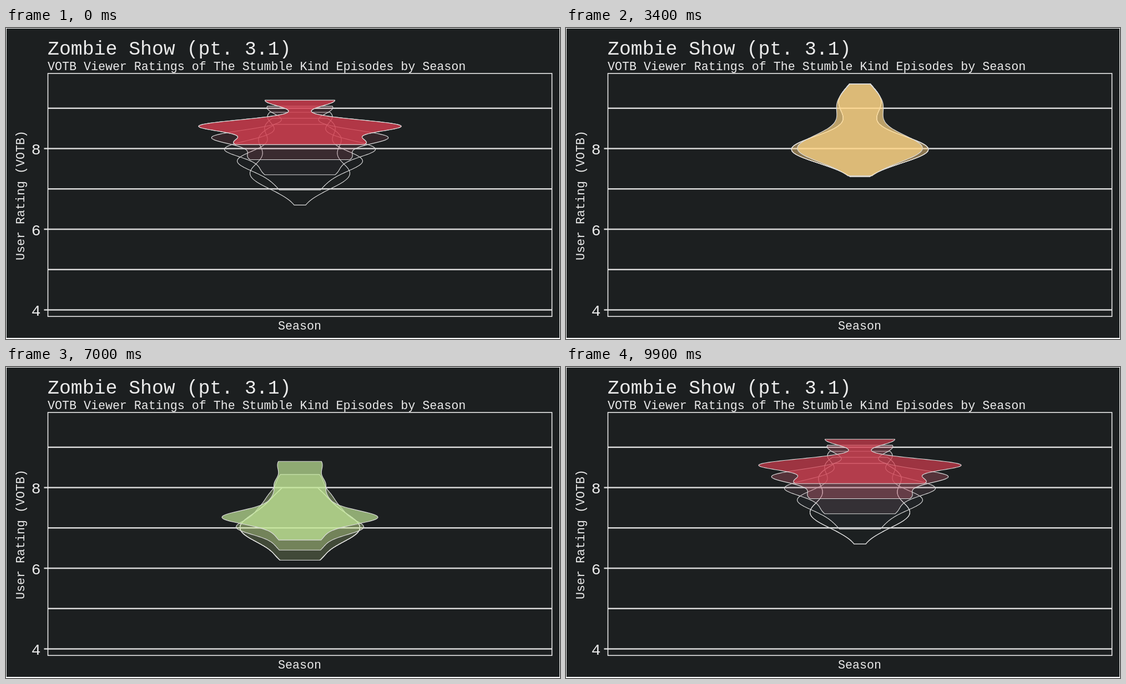
Write an HTML page that moves like this. It is 998 px wide and 561 px high and loops after 10 s.

```html
<!DOCTYPE html>
<html lang="en">
<head>
<meta charset="utf-8">
<title>Zombie Show</title>
<style>
  html, body { margin: 0; width: 100%; height: 100%; overflow: hidden; background: #fff; }
  svg { display: block; width: 998px; height: 561px; }
  text { font-family: "Liberation Mono", "Noto Sans Mono", monospace; font-size: 21.65px; fill: #ebebeb; }
  .title { font-size: 34.8px; }
  .tick { font-size: 28px; text-anchor: end; }
  .mid { text-anchor: middle; }
  .grid { stroke: #d9d9d9; stroke-width: 2.6; }
  .violin { stroke: #dcdcdc; stroke-width: 1.15; stroke-linejoin: round; }
</style>
</head>
<body>
<svg viewBox="0 0 998 561">
  <rect x="1" y="1" width="996" height="558" fill="#1c1f20"/>
  <text class="title" x="75" y="48">Zombie Show (pt. 3.1)</text>
  <text x="75" y="76">VOTB Viewer Ratings of The Stumble Kind Episodes by Season</text>
  <text class="mid" x="529" y="544">Season</text>
  <text class="mid" transform="translate(33 302) rotate(-90)">User Rating (VOTB)</text>
  <g id="axis"></g>
  <g id="violins"></g>
  <rect x="75.5" y="82" width="908" height="438.3" fill="none" stroke="#ebebeb" stroke-width="1.6"/>
</svg>
<script>
const CENTER = 529.5, STEPS = 96, FRAMES = 100, FRAME_MS = 100, WAKE = 5;
const ramp = ["#d53e4f", "#fc8d59", "#fee08b", "#ffffbf", "#e6f598", "#99d594", "#3288bd"];

const mix = (a, b, t) => a + (b - a) * t;
const mixAll = (a, b, t) => a.map((v, i) => mix(v, b[i], t));
const mixColor = (a, b, t) => `color-mix(in lab, ${a}, ${b} ${(t * 100).toFixed(1)}%)`;
const yOf = rating => 217.5 - (rating - 8) * 72.75;

function rampColor(p) {
  const at = p * (ramp.length - 1), i = Math.min(Math.floor(at), ramp.length - 2);
  return mixColor(ramp[i], ramp[i + 1], at - i);
}

// A violin is a sum of bell curves; center and spread are fractions of its height.
const bump = (center, width, spread) => p => width * Math.exp(-(((p - center) / spread) ** 2));

const season = (high, low, ...bumps) => ({
  range: [high, low],
  profile: Array.from({ length: STEPS + 1 }, (_, k) =>
    bumps.reduce((sum, bell) => sum + bell(k / STEPS), 0))
});

const seasons = [
  season(9.2, 8.1, bump(0, 63, 0.19), bump(0.575, 174, 0.19), bump(0.97, 117, 0.24)),
  season(9.2, 7.5, bump(0, 62, 0.19), bump(0.53, 112, 0.22), bump(0.92, 50, 0.25)),
  season(9.3, 7.7, bump(0.37, 84, 0.3), bump(0.84, 88, 0.26)),
  season(9.6, 7.3, bump(0.19, 38, 0.23), bump(0.705, 123, 0.21)),
  season(9.6, 7.4, bump(0.4, 68, 0.33), bump(0.78, 55, 0.32)),
  season(9.6, 7, bump(0.18, 42, 0.23), bump(0.575, 83, 0.19), bump(1, 24, 0.3)),
  season(9.2, 5.7, bump(0.05, 16, 0.2), bump(0.465, 87, 0.19), bump(0.8, 13, 0.3)),
  season(8, 6.2, bump(0.1, 30, 0.25), bump(0.56, 107, 0.33), bump(1, 18, 0.15)),
  season(9.3, 7.2, bump(0, 46, 0.17), bump(0.27, 20, 0.1), bump(0.715, 184, 0.12), bump(0.95, 42, 0.2)),
  season(9.2, 4.1, bump(0, 16, 0.12), bump(0.325, 80, 0.16), bump(0.54, 10, 0.12), bump(1, 8, 0.25)),
  season(8.6, 6.6, bump(0.16, 70, 0.24), bump(0.62, 88, 0.26))
];

// Each season rests, then moves to the next; the spare frames go to the early moves.
let clock = 0;
seasons.forEach((item, i) => {
  item.color = rampColor(i / (seasons.length - 1));
  item.start = clock + (i % 5 === 0 && i < 10 ? 4 : 5);
  item.end = clock = item.start + (i < 2 ? 5 : 4);
});

function poseAt(frame) {
  const i = Math.max(0, seasons.findIndex(item => frame < item.end));
  const from = seasons[i], to = seasons[(i + 1) % seasons.length];
  const t = frame < from.end ? Math.max(0, (frame - from.start) / (from.end - from.start)) : 0;
  const [top, bottom] = mixAll(from.range, to.range, t).map(yOf);
  const profile = mixAll(from.profile, to.profile, t);
  const side = sign => profile.map((w, k) =>
    (CENTER + sign * w).toFixed(2) + " " + mix(top, bottom, k / STEPS).toFixed(2));
  return {
    path: "M" + side(-1).concat(side(1).reverse()).join("L") + "Z",
    color: mixColor(from.color, to.color, t)
  };
}

// Past the last move the first season rests again.
const poses = Array.from({ length: FRAMES }, (_, f) => poseAt(f % clock));

function add(parent, tag, attrs, text) {
  const el = document.createElementNS("http://www.w3.org/2000/svg", tag);
  for (const key in attrs) el.setAttribute(key, attrs[key]);
  if (text !== undefined) el.textContent = text;
  return parent.appendChild(el);
}

const axis = document.getElementById("axis");
for (let rating = 4; rating <= 9; rating++) {
  const y = yOf(rating), labelled = rating % 2 === 0;
  add(axis, "line", { class: "grid", x1: labelled ? 68.5 : 75, x2: 983, y1: y, y2: y });
  if (labelled) add(axis, "text", { class: "tick", x: 62.5, y: y + 10.5 }, rating);
}

const layer = document.getElementById("violins");
const shapes = Array.from({ length: WAKE + 1 }, (_, k) =>
  add(layer, "path", { class: "violin", "fill-opacity": 0.7 * (k / WAKE) ** 3 }));

let shown = -1;
function draw(now) {
  const frame = Math.floor(now / FRAME_MS) % FRAMES;
  if (frame === shown) return;
  shown = frame;
  shapes.forEach((shape, k) => {
    const pose = poses[(frame - WAKE + k + FRAMES) % FRAMES];
    shape.setAttribute("d", pose.path);
    shape.style.fill = pose.color;
  });
}

function tick() {
  draw(performance.now());
  requestAnimationFrame(tick);
}
tick();
</script>
</body>
</html>
```
